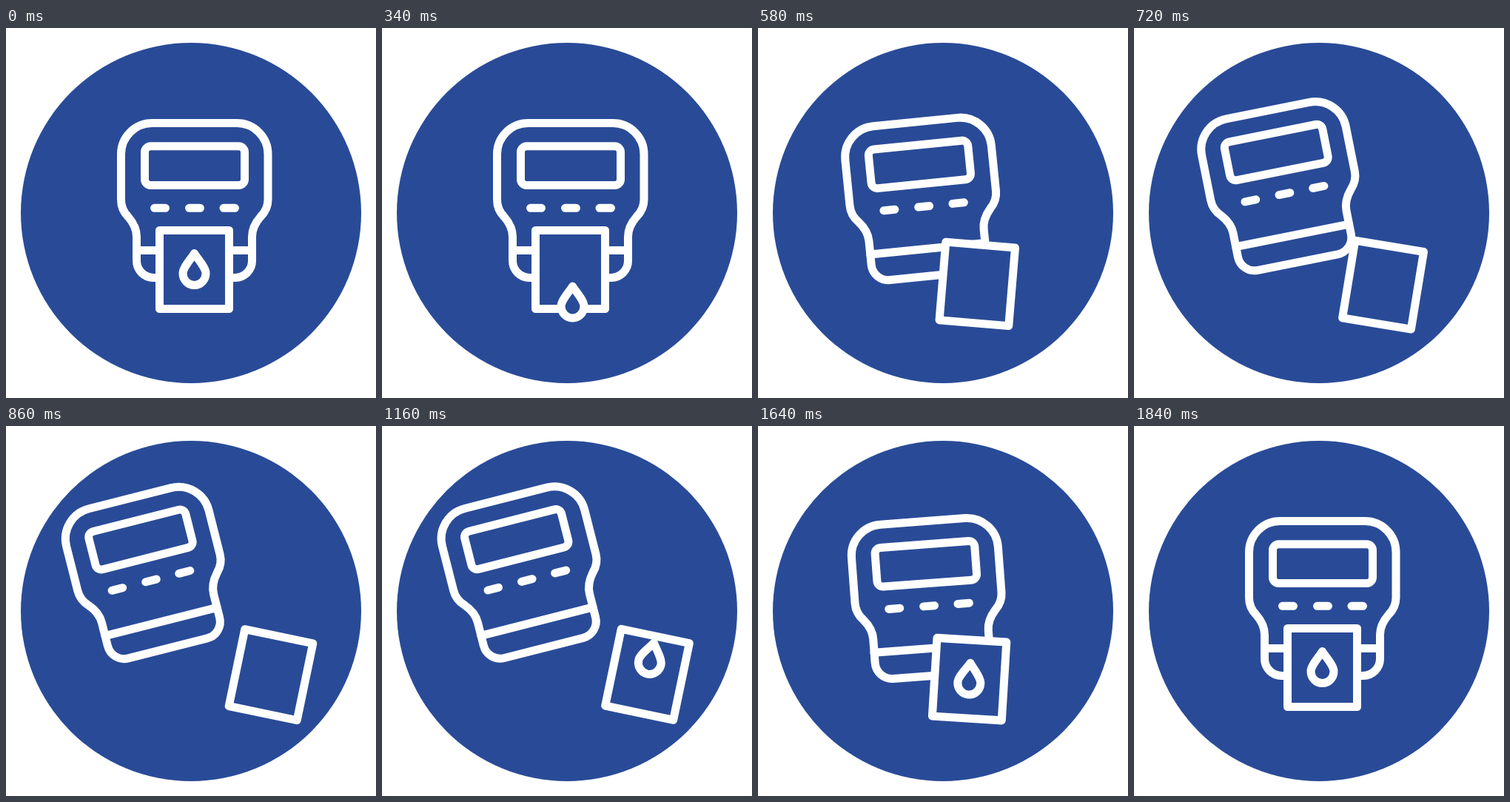
Recreate the animation shown at these times as an HTML page. Size 500 by 500 pixels, loop 2000 ms.

```html
<!DOCTYPE html>
<html lang="en">
<head>
<meta charset="utf-8">
<title>Blood test meter</title>
<style>
  html, body { margin: 0; height: 100%; overflow: hidden; background: #fff; }
  svg { display: block; width: 100vw; height: 100vh; }
  .line { fill: #294b97; stroke: #fff; stroke-width: 11; stroke-linecap: round; stroke-linejoin: round; }
</style>
</head>
<body>
<svg viewBox="0 0 500 500">
  <circle cx="250" cy="250" r="230" fill="#294b97"/>
  <g class="line">
    <g id="meter">
      <path d="M197.500 128.500H312a42 42 0 0 1 42 42V232c0 10-4 17-10 23c-7 8-11.500 16-11.500 27V314.500a23 23 0 0 1-23 23H199.500a23 23 0 0 1-23-23V282c0-11-4.500-19-11.500-27c-6-6-9.500-13-9.500-23V170.500a42 42 0 0 1 42-42z"/>
      <path d="M176.500 300.500H332.500M200.500 243.300H215.500M247.500 243.300H262.500M294 243.300H309.500"/>
      <rect x="187.500" y="159.700" width="135" height="52.800" rx="8"/>
    </g>
    <rect id="strip" x="207.500" y="273.500" width="94" height="106"/>
    <path id="drop" d="M254.500 304.500c-4 7-15.500 19-15.500 27a15.500 16 0 0 0 31 0c0-8-11.500-20-15.500-27z"/>
  </g>
</svg>
<script>
  const [meter, strip, drop] = ["meter", "strip", "drop"].map(id => document.getElementById(id));
  const ramp = (t, from, to) => Math.min(1, Math.max(0, (t - from) / (to - from)));
  const ease = (t, from, to) => (1 - Math.cos(Math.PI * ramp(t, from, to))) / 2;
  const move = (x, y) => `translate(${x} ${y})`;

  function draw(now) {
    const t = now % 2000;

    // p: 0 = assembled, 1 = fully apart
    const p = ease(t, 345, 885) - ease(t, 1300, 1840);
    meter.setAttribute("transform",
      move(-103 * p + 29.7 * p * p, 15 * p - 48 * p * p) + `rotate(${-14.3 * p} 255 186)`);
    const stripPose =
      move(104 * p, p * (59.2 - 12.2 * p - 37.7 * p * p)) + `rotate(${11.8 * p} 254.5 326.5)`;
    strip.setAttribute("transform", stripPose);

    // The drop falls away, then a new one lands on the strip
    if (t < 520) {
      const fall = ease(t, 180, 500);
      drop.setAttribute("transform", move(6 * fall, 88 * fall));
      drop.setAttribute("opacity", 1 - ramp(t, 380, 500));
    } else {
      drop.setAttribute("transform", stripPose + move(0, -88 * (1 - ease(t, 880, 1300))));
      drop.setAttribute("opacity", ramp(t, 880, 1040));
    }
  }

  const start = performance.now();
  (function tick() {
    draw(performance.now() - start);
    requestAnimationFrame(tick);
  })();
</script>
</body>
</html>
```
